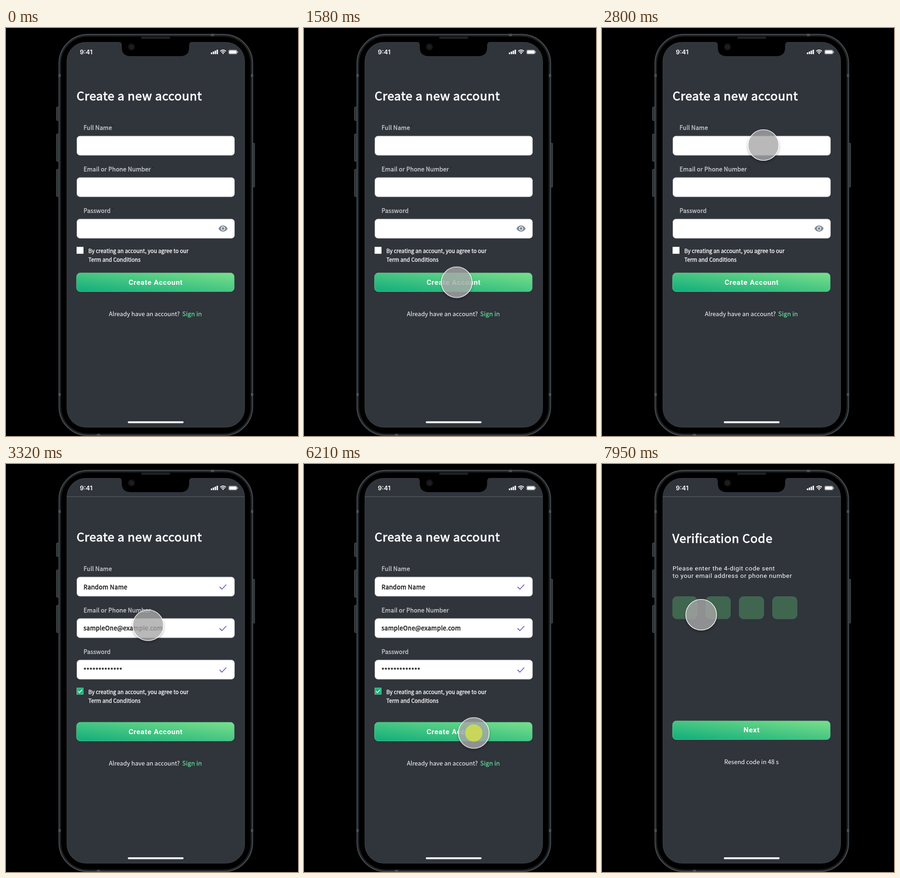
An HTML page that plays this animation: 633 px wide and 885 px high, repeating every 8000 ms.

```html
<!DOCTYPE html>
<html lang="en">
<head>
<meta charset="utf-8">
<title>Create account flow</title>
<style>
html, body { margin: 0; width: 100%; height: 100%; overflow: hidden; background: #000; }
svg { display: block; width: 633px; height: 885px; }
text { font-family: "Noto Sans CJK JP", "Noto Sans CJK SC", "Noto Sans", sans-serif; fill: #fff; }
/* a thin stroke thickens the regular weight to semibold */
.title { font-size: 26.2px; letter-spacing: .56px; stroke: #fff; stroke-width: .85px; }
.label { font-size: 12.9px; letter-spacing: .12px; fill: #c9cccf; stroke: #c9cccf; stroke-width: .35px; }
.star { font-size: 8px; fill: #15181b; }
.small { font-size: 11.5px; letter-spacing: .07px; stroke: #fff; stroke-width: .35px; }
.value { font-size: 13.2px; letter-spacing: .32px; fill: #111; stroke: #111; stroke-width: .45px; }
.foot { font-size: 13.05px; }
.link { fill: #60d394; letter-spacing: .22px; stroke: #60d394; stroke-width: .35px; }
.cta { font: 700 15.5px Roboto, sans-serif; letter-spacing: .7px; text-anchor: middle; }
.para { font: 400 13.7px Roboto, sans-serif; letter-spacing: .57px; }
.clock { font: 600 13.7px Inter, sans-serif; }
.tick { fill: none; stroke: #6a5cc0; stroke-width: 1.8; }

#signup, #filled, #verify, #tap { animation: 8s step-end infinite; }
#signup { animation-name: signup; }
#filled { animation-name: filled; }
#verify { animation-name: verify; }
#tap { animation-name: tap; }
#hint { animation: hint 8s linear infinite; }
#cursor { animation: move 8s linear infinite; }

@keyframes signup { 0% { visibility: visible } 35.8%, 100% { visibility: hidden } }
@keyframes filled { 0% { visibility: hidden } 35.8% { visibility: visible } 80.1%, 100% { visibility: hidden } }
@keyframes verify { 0% { visibility: hidden } 80.1%, 100% { visibility: visible } }
@keyframes tap {
  0%, 19.7%, 35%, 79.3%, 100% { visibility: hidden }
  18%, 33.3%, 77.6% { visibility: visible }
}
@keyframes hint { 0%, 20.6% { opacity: 0 } 22.2%, 28.5% { opacity: 1 } 30.5%, 100% { opacity: 0 } }
@keyframes move {
  0%, 2.4% { transform: translate(600px, 935px) }
  2.6% { transform: translate(592px, 890px) }
  5.25% { transform: translate(560px, 800px) }
  7.87% { transform: translate(490px, 672px) }
  10.5% { transform: translate(410px, 584px) }
  12.12% { transform: translate(364px, 557px) }
  13% { transform: translate(338px, 552px) }
  13.87%, 23.5% { transform: translate(331px, 551.5px) }
  25.75% { transform: translate(334px, 520px) }
  28.25% { transform: translate(348px, 401px) }
  29.87% { transform: translate(357px, 330px) }
  31.6% { transform: translate(354px, 270px) }
  32.5%, 39% { transform: translate(350px, 254px) }
  40.75% { transform: translate(318px, 308px) }
  41.5% { transform: translate(308px, 349px) }
  43.25% { transform: translate(310px, 455px) }
  45% { transform: translate(353px, 562px) }
  45.87%, 47.5% { transform: translate(374px, 590px) }
  49.25%, 50.3% { transform: translate(365.5px, 571px) }
  51.75%, 94.1% { transform: translate(368px, 583.5px) }
  95.87% { transform: translate(345px, 535px) }
  97.5% { transform: translate(276px, 418px) }
  98.5% { transform: translate(238px, 357px) }
  99.37%, 100% { transform: translate(215px, 327px) }
}
</style>
</head>
<body>
<svg viewBox="0 0 633 885">
  <defs>
    <linearGradient id="green" x1="0" y1="1" x2="1" y2="0">
      <stop offset=".06" stop-color="#17b07c"/>
      <stop offset=".96" stop-color="#76dd8a"/>
    </linearGradient>
    <filter id="shadow" x="-30%" y="-30%" width="160%" height="160%">
      <feDropShadow dx="0" dy="3" stdDeviation="2.5" flood-color="#000" flood-opacity=".35"/>
    </filter>

    <rect id="field" x="153.5" y="234.2" width="342" height="42" rx="7" fill="#fff" stroke="#9aa0a5" stroke-width=".9"/>
    <rect id="button" x="153" y="531.3" width="341.7" height="40.4" rx="8" fill="url(#green)" stroke="#55d08c"/>
    <path id="tick" class="tick" d="M463 255.5l5 5 9.5-10"/>
    <rect id="glow" x="153.5" y="204.5" width="342" height="72" fill="#18a0fb" fill-opacity=".08" stroke="#18a0fb" stroke-opacity=".22"/>
    <rect id="digit" x="152.5" y="287" width="54.5" height="49.5" rx="10" fill="#406650"/>

    <g id="form">
      <text class="title" x="153" y="157">Create a new account</text>
      <text class="label" x="168" y="221">Full Name</text>
      <text class="label" x="168" y="311">Email or Phone Number</text>
      <text class="label" x="168" y="401">Password</text>
      <use href="#field"/>
      <use href="#field" y="90"/>
      <use href="#field" y="180"/>
      <text class="small" x="178.5" y="488">By creating an account, you agree to our</text>
      <text class="small" x="178.5" y="507">Term and Conditions</text>
    </g>
    <g id="actions">
      <use href="#button"/>
      <text class="cta" x="324.5" y="556.5">Create Account</text>
      <text class="foot" x="223" y="625">Already have an account?</text>
      <text class="foot link" x="382" y="625">Sign in</text>
    </g>
  </defs>

  <rect width="633" height="885"/>

  <!-- phone body -->
  <g fill="#2b3134" stroke="#565d62">
    <rect x="109.5" y="171.5" width="5" height="29" rx="1"/>
    <rect x="109.5" y="230" width="5" height="59" rx="1"/>
    <rect x="109.5" y="306.5" width="5" height="59" rx="1"/>
    <rect x="534" y="250" width="5" height="95" rx="1"/>
  </g>
  <rect x="115" y="14" width="419.5" height="870" rx="62.5" fill="#1d2123" stroke="#41474b" stroke-width="2.4"/>
  <rect x="119" y="18" width="411.5" height="862" rx="58.5" stroke="#17191b"/>
  <g fill="#4a5054">
    <rect x="113.5" y="100" width="5" height="6"/>
    <rect x="531" y="100" width="5" height="6"/>
    <rect x="113.5" y="792" width="5" height="6"/>
    <rect x="531" y="792" width="5" height="6"/>
    <rect x="444" y="12.5" width="7" height="5"/>
    <rect x="197" y="880.5" width="7" height="4.5"/>
  </g>
  <rect x="293" y="19" width="63" height="4.5" rx="2.2" fill="#1f2123"/>

  <rect x="132" y="31" width="385.3" height="835" rx="41" fill="#30343b" stroke="#4b5054" stroke-width=".8"/>
  <path d="M244 30q7 0 7 8v4q0 19 19 19h108q19 0 19-19v-4q0-8 7-8z"/>
  <circle cx="272" cy="41" r="7.5" fill="#141517"/>
  <circle cx="272" cy="41" r="3.5" fill="#25272b"/>
  <circle cx="272" cy="41" r="1.5" fill="#0b0c0e"/>

  <!-- status bar -->
  <text class="clock" x="160" y="57">9:41</text>
  <g fill="#fff">
    <rect x="444" y="53" width="3" height="3.7" rx=".8"/>
    <rect x="448.2" y="51" width="3" height="5.7" rx=".8"/>
    <rect x="452.3" y="49" width="3" height="7.7" rx=".8"/>
    <rect x="456.5" y="47" width="3" height="9.7" rx=".8"/>
    <rect x="483.5" y="48.4" width="16.4" height="7.4" rx="1.5"/>
    <rect x="501.2" y="50.4" width="1.3" height="3.4" rx=".6"/>
    <path d="M468.6 54.4a3 3 0 0 1 4 0l-2 2.4z"/>
  </g>
  <g fill="none" stroke="#fff">
    <rect x="482.3" y="47.3" width="18.6" height="9.6" rx="2.6" stroke-opacity=".4"/>
    <path d="M464.4 50.3q6.2-5.2 12.4 0M466.7 52.9q3.9-3.2 7.8 0" stroke-width="1.8"/>
  </g>
  <rect x="264" y="853" width="121" height="4.3" rx="2.1" fill="#eef0f1"/>

  <g id="signup">
    <use href="#form"/>
    <text class="star" x="231" y="217">*</text>
    <text class="star" x="317" y="307">*</text>
    <text class="star" x="229" y="397">*</text>
    <path d="M460.5 435q3.6-6.8 10-6.8t10 6.8q-3.6 6.8-10 6.8t-10-6.8z" fill="#7f8b94"/>
    <circle cx="470.5" cy="435" r="3.7" fill="#7f8b94" stroke="#fff" stroke-width="1.6"/>
    <rect x="153" y="474.7" width="15" height="15" fill="#fff"/>
    <use href="#actions"/>
    <g id="hint">
      <use href="#glow"/>
      <use href="#glow" y="90"/>
      <use href="#glow" y="180"/>
    </g>
  </g>

  <g id="filled">
    <path d="M132 70.8h385" stroke="#62676b"/>
    <use href="#form" y="10.8"/>
    <text class="value" x="168" y="271.5">Random Name</text>
    <text class="value" x="168" y="361">sampleOne@example.com</text>
    <text class="value" x="168" y="452">*************</text>
    <use href="#tick" y="11"/>
    <use href="#tick" y="101"/>
    <use href="#tick" y="191"/>
    <rect x="153.5" y="485.8" width="14" height="14" fill="#1fb47c" stroke="#93cfb4" stroke-width=".8"/>
    <path d="M156.2 492.8l3 3 5.6-6" fill="none" stroke="#fff" stroke-width="1.5"/>
    <use href="#actions" y="29"/>
  </g>

  <g id="verify">
    <path d="M132 70.8h385" stroke="#62676b"/>
    <text class="title" x="152.5" y="170.7">Verification Code</text>
    <text class="para" x="153" y="231">Please enter the 4-digit code sent</text>
    <text class="para" x="153" y="247">to your email address or phone number</text>
    <use href="#digit"/>
    <use href="#digit" x="72"/>
    <use href="#digit" x="144.3"/>
    <use href="#digit" x="216.5"/>
    <use href="#button" y="26"/>
    <text class="cta" x="324.5" y="582">Next</text>
    <text class="foot" x="324" y="651" text-anchor="middle">Resend code in 48 s</text>
  </g>

  <g id="cursor">
    <circle r="33.4" fill="#afafaf" fill-opacity=".73" stroke="#fff" stroke-width="1.4" filter="url(#shadow)"/>
    <circle id="tap" r="18.8" fill="#cbd957" fill-opacity=".96"/>
  </g>
</svg>
</body>
</html>
```
